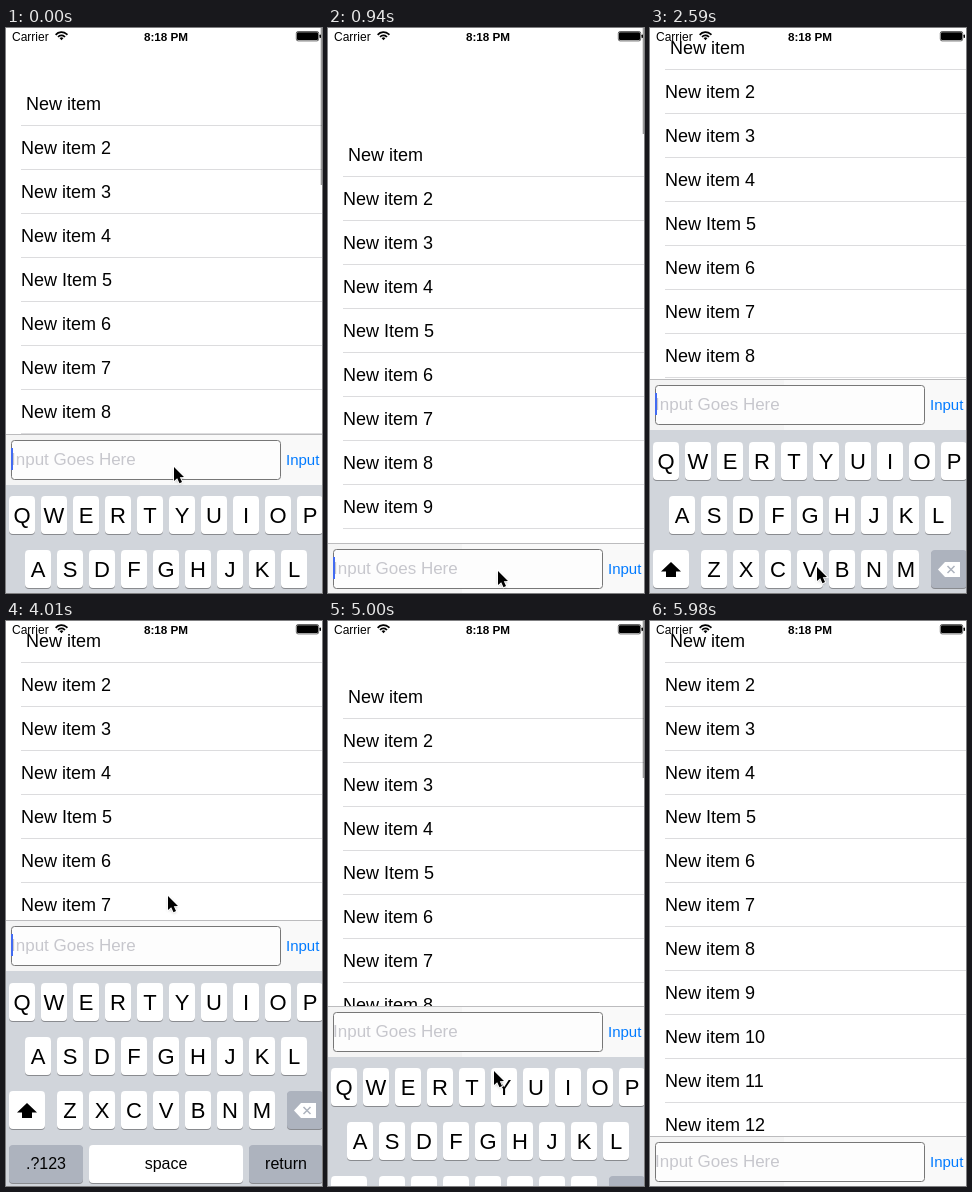
Recreate the animation shown at these times as an HTML page with a canvas. Size 316 px wide and 565 px high, loop 8230 ms.

```html
<!DOCTYPE html>
<html lang="en">
<head>
<meta charset="utf-8">
<title>List with docked input</title>
<style>
  html, body { margin: 0; width: 100%; height: 100%; overflow: hidden; background: #fff; }
  canvas { display: block; width: 316px; height: 565px; }
</style>
</head>
<body>
<canvas id="stage" width="316" height="565"></canvas>
<script>
const ctx = document.getElementById('stage').getContext('2d');
const W = 316, H = 565, LOOP = 8230;
const FONT = '"Liberation Sans", Arial, sans-serif';
const LIST_REST = 20, BAR_UP = 299.5, BAR_DOWN = 515;
const RELEASE_1 = 1000, FOCUS = 2446, DRAG = 4010, RELEASE_2 = 5580;

const mix = (a, b, p) => a + (b - a) * p;
const clamp = (v, lo, hi) => Math.min(hi, Math.max(lo, v));
const easeIn = p => p * p;
const easeOut = p => 1 - (1 - p) * (1 - p);
const easeInOut = p => p * p * (3 - 2 * p);
const linear = p => p;

// Remaining share of a critically damped spring's displacement.
const spring = ms => ms <= 0 ? 1 : (1 + 0.019 * ms) * Math.exp(-0.019 * ms);
// Resistance of the list when it is pulled past its top.
const rubber = x => x <= 0 ? 0 : H * (1 - 1 / (x * 0.55 / H + 1));

// Keys are [time, ...values, ease of the segment that ends there].
function track(keys, t) {
  const i = keys.findIndex(k => k[0] > t);
  if (i < 1) return null;
  const a = keys[i - 1], b = keys[i];
  const p = b.at(-1)((t - a[0]) / (b[0] - a[0]));
  return a.slice(1, -1).map((v, n) => mix(v, b[n + 1], p));
}

const pointerPaths = [
  [[0, 168, 439, linear], [940, 170, 543, easeOut], [1840, 170, 543, linear],
   [1890, 174, 556, linear], [2050, 175, 567, linear]],
  [[2440, 167, 567, linear], [2590, 167, 539, linear], [3240, 173, 204, easeInOut],
   [3780, 162, 275, easeInOut], [DRAG, 162, 275, linear], [5000, 166, 450, easeIn],
   [5620, 171, 570, easeOut]]
];
const fingerPath = [
  [0, 406, linear], [940, 533, easeOut], [RELEASE_1, 533, linear],
  [DRAG, 272, () => 0], [5000, 385, easeIn], [5540, 515, easeOut], [RELEASE_2, 515, linear],
  [LOOP, 515, linear]
];

function stateAt(t) {
  const finger = track(fingerPath, t)[0];
  let pull = 0, bar = BAR_DOWN, focusedAt = null, scroller = 0;
  if (t < RELEASE_1) {
    pull = rubber(finger - 293);
    bar = Math.min(BAR_DOWN, finger);
    focusedAt = 0;
    scroller = 1;
  } else if (t < FOCUS) {
    pull = rubber(240) * spring(t - RELEASE_1);
    scroller = clamp((1400 - t) / 200, 0, 1);
  } else if (t < DRAG) {
    bar = mix(BAR_UP, BAR_DOWN, spring(t - FOCUS));
    focusedAt = FOCUS;
  } else if (t < RELEASE_2) {
    pull = rubber(finger - 272);
    bar = clamp(finger, BAR_UP, BAR_DOWN);
    focusedAt = FOCUS;
    scroller = pull > 0 ? 1 : 0;
  } else {
    pull = rubber(243) * spring(t - RELEASE_2);
    scroller = clamp((5970 - t) / 200, 0, 1);
  }
  return {
    list: Math.round(LIST_REST + pull), bar, scroller,
    caret: focusedAt !== null && (t - focusedAt) % 900 < 700,
    pointer: pointerPaths.map(path => track(path, t)).find(Boolean)
  };
}

function rect(x, y, w, h, color) {
  ctx.fillStyle = color;
  ctx.fillRect(x, y, w, h);
}
function round(x, y, w, h, r, color) {
  ctx.beginPath();
  ctx.roundRect(x, y, w, h, r);
  ctx.fillStyle = color;
  ctx.fill();
}
function text(str, x, y, size, color = '#000', align = 'left', weight = '') {
  ctx.font = `${weight} ${size}px ${FONT}`;
  ctx.textAlign = align;
  ctx.fillStyle = color;
  ctx.fillText(str, x, y);
}
function shape(points, x, y, color) {
  ctx.beginPath();
  points.forEach(([px, py]) => ctx.lineTo(x + px, y + py));
  ctx.closePath();
  ctx.fillStyle = color;
  ctx.fill();
}

function drawList(top) {
  for (let i = 0; i < 13; i++) {
    const y = top + 44 * i;
    const label = i === 0 ? ' New item' : `New ${i === 4 ? 'Item' : 'item'} ${i + 1}`;
    text(label, 15, y + 6, 18);
    rect(15, y + 21, W, 1, '#dcdcde');
  }
}

function drawStatus() {
  text('Carrier', 6, 13, 12);
  text('8:18 PM', 160, 13, 11.7, '#000', 'center', 'bold');
  ctx.strokeStyle = '#000';
  ctx.lineWidth = 1.7;
  for (const r of [4.6, 7.8]) {
    ctx.beginPath();
    ctx.arc(55.5, 12, r, -Math.PI * 0.77, -Math.PI * 0.23);
    ctx.stroke();
  }
  shape([[0, 0], [-2, -2.2], [0, -3], [2, -2.2]], 55.5, 12.3, '#000');
  ctx.lineWidth = 0.6;
  ctx.beginPath();
  ctx.roundRect(290.3, 3.5, 22.4, 9.4, 1.8);
  ctx.stroke();
  round(291, 4.3, 21, 7.8, 1, '#000');
  round(313.5, 6.5, 1.5, 3.5, 0.7, '#000');
}

function drawBar(bar, caret) {
  const y = Math.floor(bar);
  rect(0, y, W, 51, '#f9f9f9');
  rect(0, y, 134, 51, '#f4f4f4');
  rect(0, y, W, 1, '#bcbcbe');
  ctx.beginPath();
  ctx.roundRect(5.5, y + 6.5, 269, 39, 3);
  ctx.fillStyle = '#fdfdfd';
  ctx.fill();
  ctx.strokeStyle = '#777';
  ctx.lineWidth = 1;
  ctx.stroke();
  text('Input Goes Here', 5, y + 31, 17, '#c7c7cd');
  if (caret) rect(5, y + 14, 2, 22, '#426bf2');
  text('Input', 280, y + 31, 15, '#007aff');
}

function drawKey(x, y, w, label = '', size = 22, color = '#fff') {
  round(x, y + 1, w, 38, 4, '#898b8f');
  round(x, y, w, 38, 4, color);
  text(label, x + w / 2, y + (size > 20 ? 27 : 24), size, '#000', 'center');
}

function drawKeyboard(y) {
  const dark = '#adb3be';
  rect(0, y - 12, W, H, '#d1d5db');
  [['QWERTYUIOP', 3], ['ASDFGHJKL', 19], ['ZXCVBNM', 51]].forEach(([letters, x], row) =>
    [...letters].forEach((c, i) => drawKey(x + 32 * i, y + 54 * row, 26, c)));

  const low = y + 108;
  drawKey(3, low, 36);
  shape([[0, -8], [10, 1.5], [5, 1.5], [5, 7], [-5, 7], [-5, 1.5], [-10, 1.5]], 21, low + 20, '#000');
  drawKey(281, low, 36, '', 22, dark);
  shape([[0, 7.5], [7, 0], [22, 0], [22, 15], [7, 15]], 288, low + 12, '#fff');
  ctx.strokeStyle = dark;
  ctx.lineWidth = 1.5;
  ctx.beginPath();
  for (const s of [-1, 1]) {
    ctx.moveTo(297.5, low + 19.5 - 3.5 * s);
    ctx.lineTo(304.5, low + 19.5 + 3.5 * s);
  }
  ctx.stroke();

  drawKey(3, y + 162, 74, '.?123', 16, dark);
  drawKey(83, y + 162, 154, 'space', 16);
  drawKey(243, y + 162, 74, 'return', 16, dark);
}

function drawPointer([x, y]) {
  const arrow = [[0, 0], [0, 14], [3.2, 11.2], [5.5, 16.2], [8, 15], [5.8, 10.2], [10, 10]];
  ctx.save();
  ctx.shadowColor = 'rgba(0,0,0,.35)';
  ctx.shadowBlur = 3;
  ctx.shadowOffsetY = 1;
  shape(arrow, x, y, '#000');
  ctx.restore();
  ctx.strokeStyle = '#fff';
  ctx.lineWidth = 1.8;
  ctx.stroke();
  ctx.fillStyle = '#000';
  ctx.fill();
}

function frame(now) {
  const s = stateAt(now % LOOP);
  rect(0, 0, W, H, '#fff');
  drawList(s.list);
  drawStatus();
  if (s.scroller) rect(314.7, 0, 2, 233 - s.list, `rgba(0,0,0,${0.4 * s.scroller})`);
  drawKeyboard(Math.round(s.bar + 62.3));
  drawBar(s.bar, s.caret);
  if (s.pointer) drawPointer(s.pointer);
  requestAnimationFrame(start);
}

let origin = null;
function start(now) {
  origin ??= now;
  frame(Math.max(0, now - origin));
}
requestAnimationFrame(start);
</script>
</body>
</html>
```
